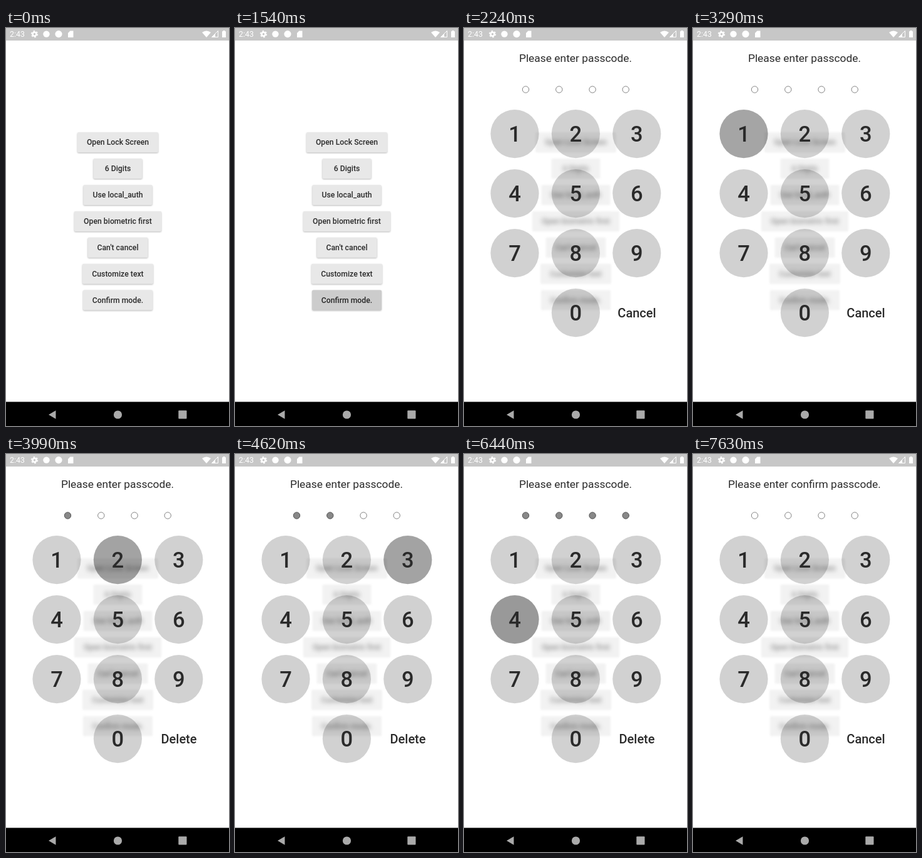
An HTML page for the animation above (8000 ms loop, 356 px wide and 634 px high).

```html
<!DOCTYPE html>
<html lang="en">
<head>
<meta charset="utf-8">
<title>Passcode lock screen</title>
<style>
  html, body { margin: 0; width: 100%; height: 100%; overflow: hidden; background: #fff; }
  svg { display: block; width: 356px; height: 634px; }
  text { font-family: Roboto, "Open Sans", sans-serif; font-weight: 500; fill: #2a2a2a; text-anchor: middle; }
  #boxes rect { fill: #e8e8e8; }
  #labels text { font-size: 12.25px; }
  #title { font-size: 17.4px; font-weight: 400; }
  #keys text { font-size: 34.6px; }
  #action { font-size: 20px; }
  #dots circle { stroke-width: 1; }
  #clock { font-size: 12.4px; font-weight: 400; fill: #fff; text-anchor: start; }
</style>
</head>
<body>
<svg viewBox="0 0 356 634">
  <rect width="356" height="634" fill="#fff"/>
  <g id="menu">
    <g id="boxes"></g>
    <g id="labels"></g>
  </g>
  <rect id="tap" x="123" y="417.5" width="111" height="32" rx="2"/>
  <g id="lock">
    <text id="title" x="178" y="54"></text>
    <g id="dots"></g>
    <g id="keys"></g>
    <text id="action" x="276" y="460.7"></text>
  </g>

  <rect width="356" height="20" fill="#c7c7c7"/>
  <text id="clock" x="6" y="14">2:43</text>
  <g fill="#fff">
    <circle cx="45.5" cy="9.7" r="3" fill="none" stroke="#fff" stroke-width="2.6"/>
    <circle cx="45.5" cy="9.7" r="4.9" fill="none" stroke="#fff" stroke-width="1.6" stroke-dasharray="2.6 2.53"/>
    <circle cx="64.5" cy="9.6" r="5.2"/>
    <circle cx="84" cy="9.6" r="5.6"/>
    <path d="M102.5 4.5H107.5V15H99V8Z"/>
    <path d="M313 7Q320 1.8 327 7L320 15Z"/>
    <path d="M338.5 4.5V14.5H328.5Z" fill="none" stroke="#fff"/>
    <path d="M334 9V14.5H328.5Z"/>
    <path d="M346.5 4H349.5V5.2H351V15H345V5.2H346.5Z"/>
  </g>

  <rect y="595.5" width="356" height="39"/>
  <g fill="#aaa">
    <path d="M68 616L79.5 609.3V622.7Z"/>
    <circle cx="178.5" cy="616" r="6.6"/>
    <rect x="275.3" y="609.3" width="13.2" height="13.2" rx="1"/>
  </g>
</svg>
<script>
const LOOP = 8000, STEP = 70;
const $ = id => document.getElementById(id);
const clamp = x => Math.min(1, Math.max(0, x));

function add(parent, tag, attrs, text = '') {
  const el = document.createElementNS('http://www.w3.org/2000/svg', tag);
  for (const k in attrs) el.setAttribute(k, attrs[k]);
  el.textContent = text;
  return $(parent).appendChild(el);
}

const menu = [
  ['Open Lock Screen', 129], ['6 Digits', 78], ['Use local_auth', 110],
  ['Open biometric first', 139], ["Can't cancel", 96],
  ['Customize text', 113], ['Confirm mode.', 111]
];
menu.forEach(([label, width], i) => {
  const y = 166.2 + i * 41.9;
  add('boxes', 'rect', { x: 178.5 - width / 2, y, width, height: 32, rx: 2 });
  add('labels', 'text', { x: 178.5, y: y + 20.2 }, label);
});

const dots = [98.5, 151.8, 205.1, 258.2].map(cx => add('dots', 'circle', { cx, cy: 98, r: 5.2 }));

const shades = {};
['1', '2', '3', '4', '5', '6', '7', '8', '9', '', '0'].forEach((digit, i) => {
  if (!digit) return;
  const cx = 81 + (i % 3) * 97.4, cy = 168.6 + Math.floor(i / 3) * 95;
  add('keys', 'circle', { cx, cy, r: 38.6, 'fill-opacity': .18 });
  shades[digit] = add('keys', 'circle', { cx, cy, r: 38.6, 'fill-opacity': 0 });
  add('keys', 'text', { x: cx, y: cy + 12.2 }, digit);
});

// down, fully dark, release, faded out, strength, dot filled
const presses = [
  [3150, 3290, 3360, 3640, .21, 3430],
  [3710, 3920, 4130, 4410, .22, 4130],
  [4480, 4620, 4690, 4970, .22, 4760],
  [5320, 5600, 7210, 7630, .27, 5740]
];
const RESET = 7280;

const pulse = (t, [down, full, up, end, strength]) =>
  strength * clamp((t - down) / (full - down)) * clamp((end - t) / (end - up));

function draw(t) {
  const open = t < 2030 ? 0 : clamp((t - 1911) / 300);
  $('boxes').style.filter = open
    ? `blur(${1.6 * open}px)`
    : 'drop-shadow(0 1px 1px rgba(0,0,0,.28))';
  $('labels').style.filter = open ? `blur(${3.5 * open}px)` : 'none';
  $('menu').style.opacity = 1 - .45 * open ** 3;
  $('tap').style.opacity = pulse(t, [1400, 1540, 1610, 1820, .12]);

  $('lock').style.display = open ? '' : 'none';
  $('lock').setAttribute('transform', `translate(0 ${Math.max(0, 513 - 4.6 * (t - 2100))})`);

  const confirming = t >= RESET;
  presses.forEach((p, i) => {
    shades[i + 1].setAttribute('fill-opacity', pulse(t, p));
    const on = t >= p[5] && !confirming;
    dots[i].setAttribute('fill', on ? '#888' : '#fff');
    dots[i].setAttribute('stroke', on ? '#555' : '#858585');
  });
  $('title').textContent = `Please enter ${confirming ? 'confirm ' : ''}passcode.`;
  $('action').textContent = t >= presses[0][5] && !confirming ? 'Delete' : 'Cancel';
}

const start = performance.now();
let last = -1;
function tick() {
  const t = Math.floor((performance.now() - start) % LOOP / STEP) * STEP;
  if (t !== last) draw(last = t);
  requestAnimationFrame(tick);
}
tick();
</script>
</body>
</html>
```
